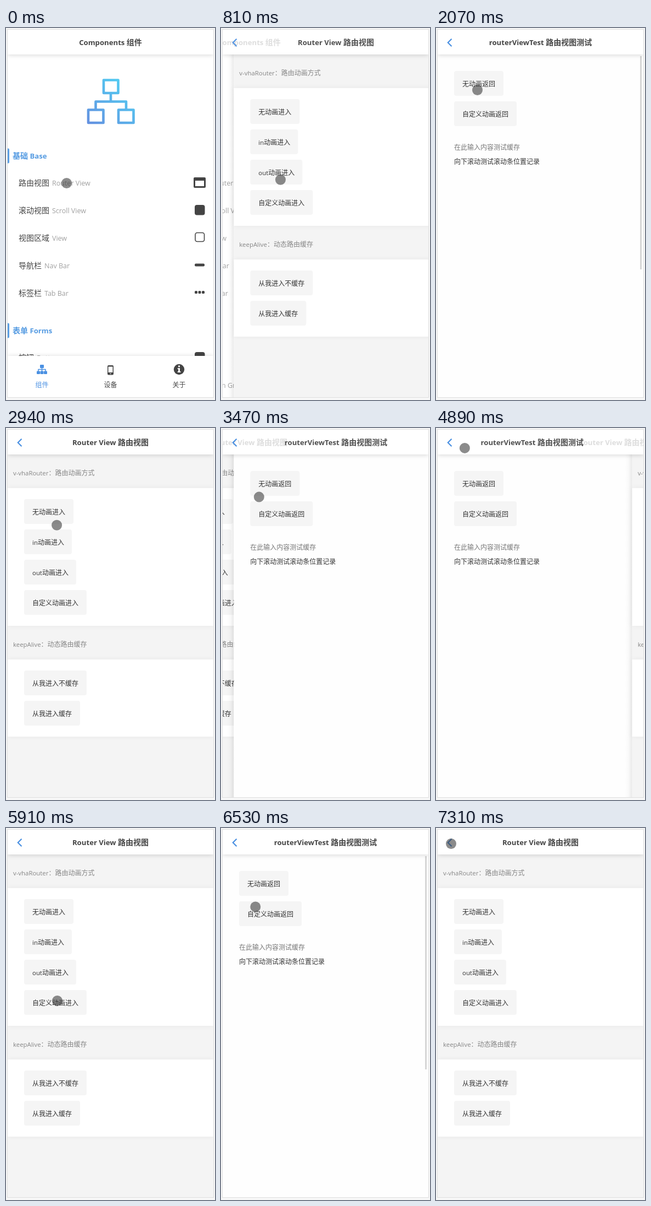
These frames come from a looping animation (381 by 675 pixels, 9.46 s). An HTML page:

```html
<!DOCTYPE html>
<html lang="zh-CN">
<head>
<meta charset="utf-8">
<title>Components</title>
<style>
html, body { margin: 0; width: 100%; height: 100%; overflow: hidden; background: #f8f8f8; }
svg { display: block; width: 381px; height: 675px; }
text { font-family: "Open Sans", "Noto Sans CJK SC", "Noto Sans CJK", sans-serif; white-space: pre; }
.bar { fill: #fff; filter: drop-shadow(0 1px 4px rgba(0,0,0,.16)); }
.panel { fill: #fff; filter: drop-shadow(0 0 4px rgba(0,0,0,.05)); }
</style>
</head>
<body>
<svg viewBox="0 0 381 675">
  <defs>
    <clipPath id="stage"><rect x="3" y="3" width="375" height="667"/></clipPath>
    <linearGradient id="edge"><stop offset="0" stop-opacity="0"/><stop offset=".5" stop-opacity=".02"/><stop offset="1" stop-opacity=".085"/></linearGradient>
    <linearGradient id="sky" gradientUnits="userSpaceOnUse" x1="148" y1="176" x2="213" y2="100">
      <stop offset="0" stop-color="#648fe0"/><stop offset="1" stop-color="#52caf1"/>
    </linearGradient>
  </defs>
  <g clip-path="url(#stage)">
    <g id="pages"></g>
    <rect id="scroll" x="372" y="51" width="3" height="387" fill="#d6d6d6"/>
    <g id="tabs"></g>
    <rect class="bar" x="3" y="-5" width="375" height="53"/>
    <g id="titles"></g>
    <path id="back" d="M28.5 19.8L21.8 26.5L28.5 33.2" fill="none" stroke="#4a90e2" stroke-width="2.2"/>
  </g>
  <rect x="2.5" y="2.5" width="376" height="668" fill="none" stroke="#dedede"/>
  <circle id="dot" r="9.5" fill="#333" fill-opacity=".57"/>
</svg>
<script>
const LOOP = 9460, W = 375, DARK = '#444', BLUE = '#4a90e2';
const $ = id => document.getElementById(id);
const clamp = v => Math.max(0, Math.min(1, v));

// Latin runs are set slightly smaller than the CJK glyphs
function text(s, x, y, size, fill = DARK, attrs = '', ratio = .95) {
  const body = s.replace(/[\x20-\x7e]+/g, m => `<tspan font-size="${size * ratio}">${m}</tspan>`);
  return `<text x="${x}" y="${y + size * .35}" font-size="${size}" fill="${fill}" ${attrs}>${body}</text>`;
}
const bold = (s, x, y, fill, attrs = '') => text(s, x, y, 14, fill, `font-weight="700" ${attrs}`, .94);
const rect = (x, y, w, h, r = 0, fill = DARK, attrs = '') =>
  `<rect x="${x}" y="${y}" width="${w}" height="${h}" rx="${r}" fill="${fill}" ${attrs}/>`;
const button = (s, y, w) => rect(33, y, w, 45, 4, '#f5f5f5') + text(s, 48, y + 23.5, 12, '#333');
const panel = (y, h) => rect(3, y, W, h, 0, '#fff', 'class="panel"');
const section = (s, y) => rect(1, y - 13.5, 5, 27, 2, '#5b9fe3') + bold(s, 12, y, '#559be2');
const row = (cn, en, y) => text(cn, 23, y, 14) + text(en, 28 + cn.length * 14, y + .3, 12.5, '#a0a0a0', '', 1);

function homePage() {
  const icon = `<g fill="none" stroke="url(#sky)" stroke-width="4.6" stroke-linejoin="round">
    <path d="M178 94.5h26.5v23.5h-26.5zM150 148.5h27.5v23.5h-27.5zM205 148.5h27.5v23.5h-27.5z
      M191 118v15M163.5 148v-14.5h55.5v14.5"/></g>`;
  return icon + section('基础 Base', 232)
    + row('路由视图', 'Router View', 281) + rect(342, 271, 22, 19, 2) + rect(345, 277, 16, 10, 0, '#fff')
    + row('滚动视图', 'Scroll View', 331) + rect(344, 321, 18.5, 18.5, 4)
    + row('视图区域', 'View', 381) + rect(345, 371.5, 16.5, 16, 3.5, 'none', `stroke="${DARK}" stroke-width="1.6"`)
    + row('导航栏', 'Nav Bar', 431) + rect(344, 427.5, 18, 5, 2)
    + row('标签栏', 'Tab Bar', 481) + [344, 350.5, 357].map(x => rect(x, 477, 5, 5, 1.6)).join('')
    + section('表单 Forms', 549)
    + row('按钮', 'Button', 598) + rect(344, 588, 18.5, 18.5, 4)
    + row('按钮组', 'Button Group', 648);
}

const routerPage = () => text('v-vhaRouter：路由动画方式', 13, 82, 12, '#868686') + panel(109, 250)
  + button('无动画进入', 129, 90) + button('in动画进入', 184, 87)
  + button('out动画进入', 239, 95) + button('自定义动画进入', 294, 114)
  + text('keepAlive：动态路由缓存', 13, 393, 12, '#868686') + panel(420, 140)
  + button('从我进入不缓存', 440, 114) + button('从我进入缓存', 495, 102);

const testPage = () => button('无动画返回', 78, 90) + button('自定义动画返回', 133, 114)
  + text('在此输入内容测试缓存', 33, 217, 12, '#777') + text('向下滚动测试滚动条位置记录', 33, 243, 12, '#333');

const tab = (s, x, fill) => text(s, x, 647.5, 12, fill, 'text-anchor="middle"');
$('tabs').innerHTML = rect(3, 595, W, 80, 0, '#fff', 'class="bar"')
  + rect(62, 611, 7, 6, 1, BLUE) + [56, 62.5, 69].map(x => rect(x, 622.5, 6, 5.5, 1, BLUE)).join('')
  + `<path d="M65.5 616v7M59 623v-3.5h13v3.5" fill="none" stroke="${BLUE}" stroke-width="1.5"/>`
  + rect(185, 612, 11, 17.5, 2) + rect(186.5, 614.5, 8, 10.5, 0, '#fff') + rect(189.5, 626.5, 2, 1.5, .7, '#fff')
  + `<circle cx="315.5" cy="619.5" r="9.7" fill="${DARK}"/>`
  + '<path d="M314 612.5h3v2.8h-3zM312.8 617h4.2v6h1.3v2h-5.5v-2h1.3v-4h-1.3z" fill="#fff"/>'
  + tab('组件', 65.5, BLUE) + tab('设备', 190.5) + tab('关于', 315.5);

function group(parent, html) {
  const g = document.createElementNS('http://www.w3.org/2000/svg', 'g');
  g.innerHTML = html;
  return parent.appendChild(g);
}
function makePage(title, bg, html) {
  return {
    body: group($('pages'), rect(-10, 48, 13, 622, 0, 'url(#edge)') + rect(3, 48, W, 622, 0, bg) + html),
    title: group($('titles'), bold(title, 190.5, 26, DARK, 'text-anchor="middle"'))
  };
}
const home = makePage('Components 组件', '#fff', homePage());
const router = makePage('Router View 路由视图', '#f4f4f4', routerPage());
const test = makePage('routerViewTest 路由视图测试', '#fefefe', testPage());
const all = [home, router, test];

// start, leaving page, entering page, kind, duration
const steps = [
  [562, home, router, 'push', 350],
  [1680, router, test, 'cut', 1],
  [2480, test, router, 'cut', 1],
  [3222, router, test, 'push', 350],
  [4080, test, router, 'pop', 350],
  [4642, router, test, 'pop', 350],
  [5342, test, router, 'pop', 350],
  [6010, router, test, 'fade', 280],
  [6830, test, router, 'fade', 300]
];

// time, x, y of the touch dot
const touch = [
  [0, 110, 281], [580, 110, 281], [810, 108, 275], [1370, 82, 150], [1750, 82, 150],
  [2070, 75, 112], [2220, 73, 105], [2310, 75, 104], [2620, 75, 104], [3090, 100, 209],
  [3240, 100, 209], [3470, 69, 125], [3720, 28, 28], [4180, 29, 27], [4490, 90, 258],
  [4660, 90, 258], [4890, 52, 36], [5050, 30, 17], [5210, 28, 25], [5520, 28, 25],
  [5910, 93, 313], [6290, 93, 313], [6690, 42, 30], [6840, 42, 30], [7300, 27, 28], [LOOP, 27, 28]
];
const scrolls = [[1690, 2200], [3600, 3950], [5000, 5260], [6260, 6800]];

// cubic-bezier(.25, .1, .25, 1)
function ease(x) {
  let lo = 0, hi = 1;
  const bez = (s, a, b) => 3 * (1 - s) ** 2 * s * a + 3 * (1 - s) * s * s * b + s ** 3;
  for (let i = 0; i < 20; i++) {
    const mid = (lo + hi) / 2;
    if (bez(mid, .25, .25) < x) lo = mid; else hi = mid;
  }
  return bez(hi, .1, 1);
}

function place(node, x, opacity) {
  node.setAttribute('display', 'inline');
  node.setAttribute('transform', `translate(${x} 0)`);
  node.setAttribute('opacity', opacity);
}

function drawPages(t) {
  const step = steps.filter(s => s[0] <= t).pop();
  const [start, from, to, kind, time] = step || [0, home, home, 'cut', 1];
  const raw = clamp((t - start) / time), done = kind === 'cut' || raw === 1;
  const p = done ? 1 : ease(raw), q = 1 - p;

  for (const { body, title } of all) {
    body.setAttribute('display', 'none');
    title.setAttribute('display', 'none');
  }
  if (!done) {
    const push = kind === 'push', pop = kind === 'pop';
    place(from.body, push ? -107 * p : pop ? W * p : 0, 1);
    place(from.title, push ? -147 * p : pop ? 147 * p : 0, kind === 'fade' ? q : 1 - .87 * p);
    $('pages').append(...(pop ? [to.body, from.body] : [from.body, to.body]));
    place(to.body, push ? W * q : 0, kind === 'fade' ? p : 1);
    place(to.title, push ? 350 * q : pop ? -280 * q : 0, p);
  } else {
    place(to.body, 0, 1);
    place(to.title, 0, 1);
  }
  const away = to === home ? 0 : from === home ? p : 1;
  $('tabs').setAttribute('transform', `translate(0 ${95 * away})`);
  $('back').setAttribute('opacity', away);
}

function draw(t) {
  drawPages(t);
  const bar = Math.max(...scrolls.map(([a, b]) => Math.min(clamp((t - a) / 200), clamp((b + 110 - t) / 110))));
  $('scroll').setAttribute('opacity', bar);
  const i = touch.findIndex(k => k[0] > t), [t0, x0, y0] = touch[i - 1], [t1, x1, y1] = touch[i];
  const f = (t - t0) / (t1 - t0);
  $('dot').setAttribute('cx', x0 + (x1 - x0) * f + .5);
  $('dot').setAttribute('cy', y0 + (y1 - y0) * f + .5);
}

const begin = performance.now();
function tick() {
  draw((performance.now() - begin) % LOOP);
  requestAnimationFrame(tick);
}
tick();
</script>
</body>
</html>
```
